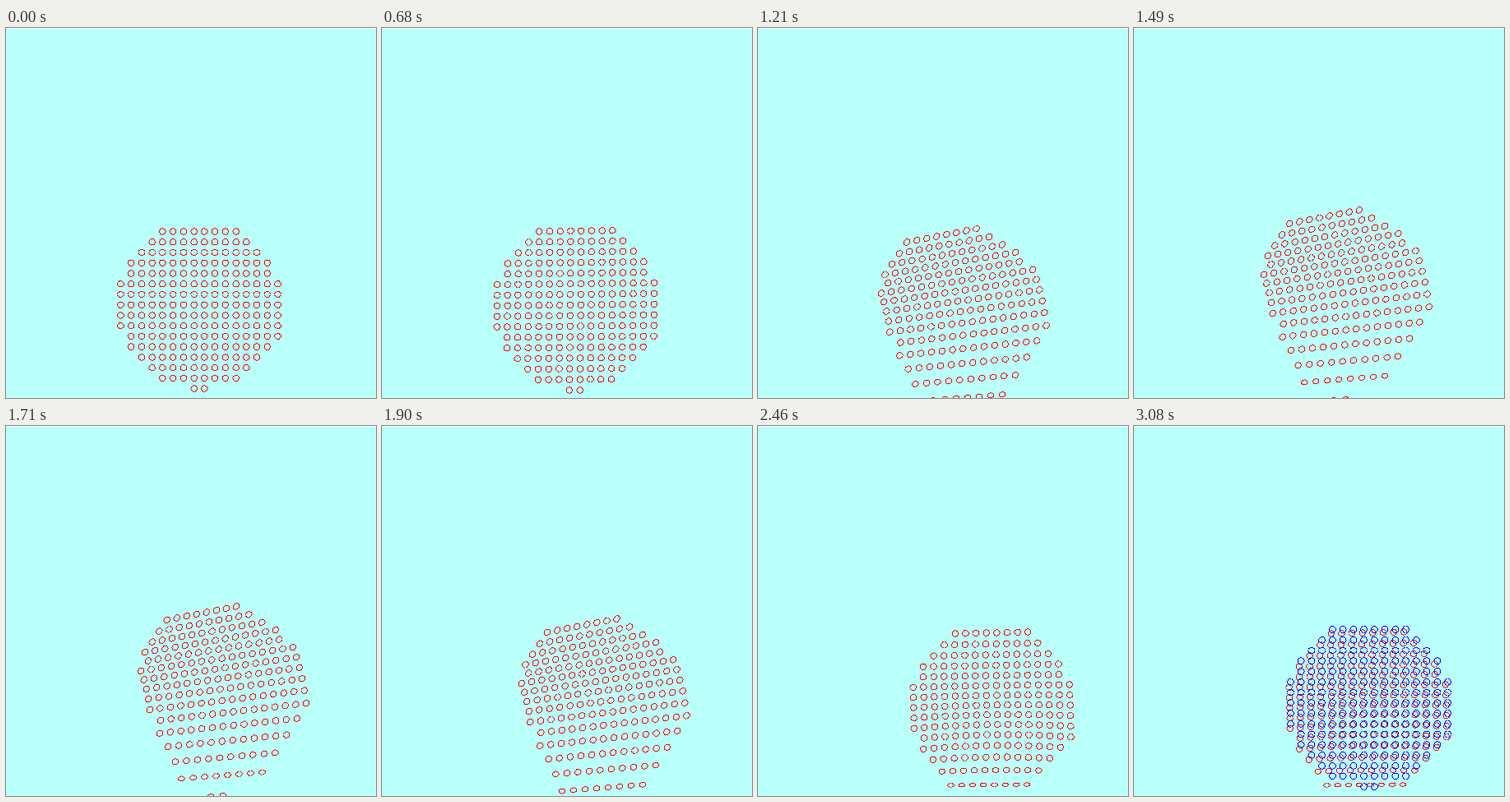
An HTML page with a canvas for the animation above (4.1 s loop, 450 by 450 pixels).

```html
<!DOCTYPE html>
<html lang="en">
<head>
<meta charset="utf-8">
<title>Soft disc</title>
<style>
html, body { margin: 0; width: 100%; height: 100%; overflow: hidden; background: #b9fffa; }
canvas { display: block; }
</style>
</head>
<body>
<canvas id="stage" width="450" height="450"></canvas>
<script>
const ctx = document.getElementById('stage').getContext('2d');
const LOOP = 4100, MOVE_AT = 675, GOAL_AT = 3080, STEP_MS = 1000 / 36;
const GRID = 16, GAP = 12.74, GOAL_SHIFT = 4 * GAP;
const HALF_WIDTH = 7.5 * GAP, GRAVITY = .16;

// Grid cells inside a circle.
const cells = [];
for (let row = 0; row < GRID; row++) {
  for (let col = 0; col < GRID; col++) {
    if ((col - 7.51) ** 2 + (row - 7.02) ** 2 < 65) cells.push({ col, row });
  }
}

// belly: lower rows spread apart, flare: the lowest ones most of all,
// lift: bends the path that leads to the pose.
const rest = {
  step: 0, x: 234.5, y: 336.2, height: 7 * GAP,
  belly: 0, flare: 0, tilt: 0, shear: 0, sag: 0, lift: 0
};
const fall = {
  ...rest, step: 7, x: 237, y: 343.7, height: 97,
  belly: 2.3, tilt: 7.2, shear: -5, lift: GRAVITY
};
const flight = {
  ...rest, height: 86, belly: 19.5, flare: 12.7,
  tilt: 13, shear: 22.5, lift: GRAVITY
};
const poses = [
  rest,
  fall,
  { ...flight, step: 20, x: 248.8, y: 331 },
  { ...flight, step: 30, x: 257, y: 308.3 },
  { ...flight, step: 45, x: 268.8, y: 321.4 },
  { step: 59, x: 277.5, y: 346.5, height: 81,
    belly: 7.8, flare: 15.6, tilt: 5, shear: 10, sag: 5.5, lift: -.1 },
  { step: 65, x: 284, y: 340.6, height: 87.4,
    belly: 2.9, flare: 5.1, tilt: 1.5, shear: 2.5, sag: 4.5, lift: 0 }
];
const LAST_STEP = poses.at(-1).step;

function poseAt(step) {
  const i = Math.max(1, poses.findIndex(p => p.step >= step));
  const a = poses[i - 1], b = poses[i];
  const t = (step - a.step) / (b.step - a.step);
  const pose = {};
  for (const key in rest) pose[key] = a[key] + (b[key] - a[key]) * t;
  pose.y -= b.lift * (step - a.step) * (b.step - step);
  return pose;
}

// Crisp one pixel outline without smoothing.
function ring(x, y, rx, ry, slope, color) {
  ctx.fillStyle = color;
  const dots = 22;
  for (let i = 0; i < dots; i++) {
    const a = i / dots * 2 * Math.PI, dx = rx * Math.cos(a);
    ctx.fillRect(Math.round(x + dx), Math.round(y + ry * Math.sin(a) + slope * dx), 1, 1);
  }
}

function drawBody(p) {
  for (const { col, row } of cells) {
    const u = (col - 7.5) / 7.5, v = (row - 7) / 7, depth = row / 14;
    const half = HALF_WIDTH + .13 * p.belly * (v - 1) + .75 * p.flare * Math.max(0, v) ** 3;
    const tilt = p.tilt * (1 - .35 * v);
    const sag = p.sag * (1 - u * u) * 12 * depth ** 4 * (1 - depth);
    const x = p.x + half * u + p.shear * v - .7 * p.belly * v ** 2 - .8 * p.flare * v ** 3;
    const y = p.y + p.height * v + p.belly * v ** 2 + p.flare * v ** 3 - tilt * u - sag;
    const squash = (.02 * p.flare + .1 * p.sag) * Math.max(0, row - 12) ** 1.5;
    ring(x, y, 3.7, Math.max(.8, 3.7 - squash), -tilt / half, '#f00');
  }
}

function drawGoal() {
  for (const { col, row } of cells) {
    const x = rest.x + GOAL_SHIFT + (col - 7.5) * GAP;
    ring(x, rest.y + (row - 7) * GAP, 3.9, 3.9, 0, '#00f');
  }
}

function render(t) {
  const step = Math.floor((t - MOVE_AT) / STEP_MS) + 1;
  ctx.fillStyle = '#b9fffa';
  ctx.fillRect(0, 0, 450, 450);
  ctx.fillStyle = '#fff';
  ctx.fillRect(0, 0, 450, 1);
  drawBody(poseAt(Math.min(LAST_STEP, Math.max(0, step))));
  if (t >= GOAL_AT) drawGoal();
}

const start = performance.now();
function tick() {
  render((performance.now() - start) % LOOP);
  requestAnimationFrame(tick);
}
tick();
</script>
</body>
</html>
```
